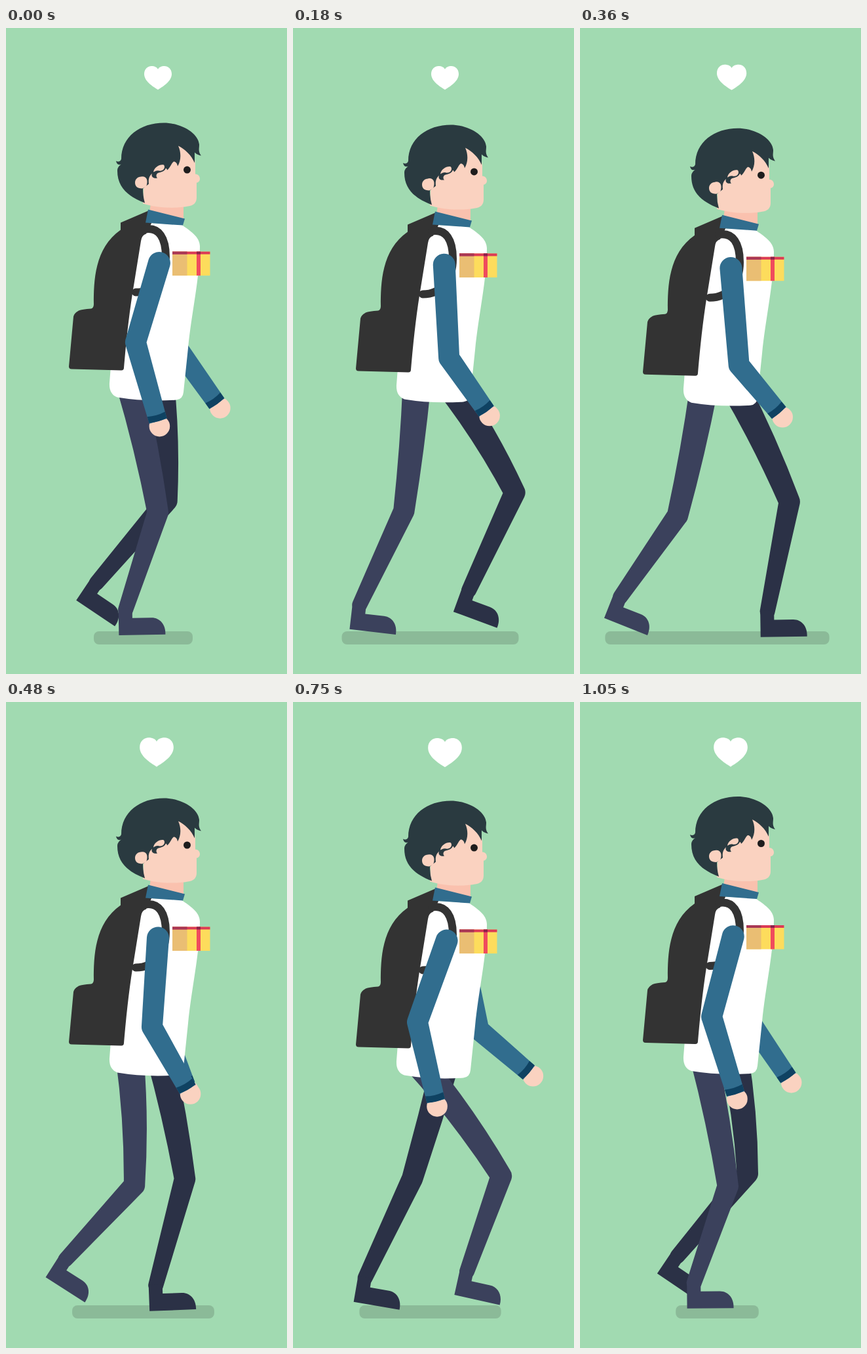
Recreate the animation shown at these times as an HTML page. Size 429 px wide and 984 px high, loop 1.08 s.

```html
<!DOCTYPE html>
<html lang="en">
<head>
<meta charset="utf-8">
<title>Walking</title>
<style>
  html, body { margin: 0; width: 100%; height: 100%; overflow: hidden; background: #a1dab1; }
  svg { display: block; width: 100vw; height: 100vh; }
  .near { fill: #3b415c; }
  .far { fill: #2b3146; }
  .bag { fill: #333; }
  .skin { fill: #fad2c0; }
  .hair { fill: #2a3a40; }
  .sleeve { fill: #316d8e; }
  .cuff { fill: #0f4262; }
</style>
</head>
<body>
<svg viewBox="0 0 429 984">
  <rect id="shadow" y="919" height="20" rx="8" fill="#8bba98"/>
  <path id="heart" fill="#fff" d="M0 18C-8 13-21 5-21-6C-21-14-15-18-10-18C-5-18-1-16 0-13C1-16 5-18 10-18C15-18 21-14 21-6C21 5 8 13 0 18Z"/>

  <g id="farArm"></g>
  <g id="farLeg" class="far"></g>
  <g id="nearLeg" class="near"></g>

  <g id="body">
    <path fill="#fff" d="M213 296L268 299C280 308 296 317 296 332C296 380 283 435 278 487L271 554Q270 565 260 566Q212 569 170 562Q157 557 158 540L160 515L200 320Z"/>
    <path class="bag" d="M175 296L217 278L222 297L214 313Q207 315 206 324L195 392Q186 445 180 517Q180 521 176 521L100 519Q96 519 96 515L103 439Q104 434 111 430Q116 428 130 427Q134 426 134 420C134 385 135 335 175 307Z"/>
    <path fill="none" stroke="#333" stroke-width="12" stroke-linecap="round" d="M212 306C234 302 244 320 244 348C244 378 228 402 198 402"/>
    <path fill="#fac1ae" d="M221 266H271V292L219 282Z"/>
    <path class="sleeve" d="M217 276L273 290L270 300L213 296Z"/>
    <path class="skin" d="M211 220L263 178L280 183Q288 194 289 206V222C294 222 296 226 296 229C296 233 293 235 291 235V258C291 266 286 270 278 271C255 275 228 273 209 267Z"/>
    <path class="hair" d="M176 207C171 209 169 206 168 202C171 204 175 203 176 199C176 165 205 144 241 144C268 144 294 160 295 177C295 184 293 187 298 194C294 193 291 192 288 189L288 205C283 193 273 184 263 179C268 190 267 202 262 210C261 205 259 203 256 203C252 206 251 212 246 216Q246 214 244 213C242 219 234 219 231 221C229 223 229 226 231 228C225 229 221 226 223 221C219 225 217 229 218 237L209 244Q209 256 212 266C186 256 170 242 170 217C170 212 173 209 176 207Z"/>
    <path class="skin" d="M225 219C226 211 236 206 241 208C244 212 240 218 234 217C230 216 228 217 225 219Z"/>
    <path class="skin" d="M206 226C214 224 218 231 214 241L208 244C200 244 197 240 197 235C197 230 201 226 206 226Z"/>
    <circle cx="276.5" cy="215.5" r="5.5" fill="#1e1d1d"/>
    <g>
      <rect x="254" y="340" width="57.5" height="36.5" fill="#fddc5c"/>
      <rect x="254" y="340" width="22.5" height="36.5" fill="#eabe73"/>
      <rect x="291" y="340" width="6" height="36.5" fill="#ef4b5d"/>
      <rect x="254" y="340" width="57.5" height="4" fill="#db3a57"/>
      <rect x="254" y="340" width="22.5" height="4" fill="#a83755"/>
      <rect x="291" y="340" width="6" height="4" fill="#8c2348"/>
    </g>
  </g>
  <g id="nearArm"></g>
</svg>
<script>
const LOOP = 1080, STEP = 30;
const STRIDE = 1034, HALF = STRIDE / 2;  // the loop cuts in slightly after a full stride
const TAU = 2 * Math.PI;

// Periodic swing: a centre plus one slow and one double-speed wave
function swing(t, centre, c1, s1, c2, s2) {
  const p = TAU * t / STRIDE;
  return centre + c1 * Math.cos(p) + s1 * Math.sin(p) + c2 * Math.cos(2 * p) + s2 * Math.sin(2 * p);
}

// Limbs of both sides follow the same swings, half a stride apart
const knee = t => [swing(t, 229.4, 6.6, -83.4, -4.2, 10.5), swing(t, 733.2, 2.9, 7.5, 1.7, -5.7)];
const heel = t => [swing(t, 141.5, 45.6, -98.1, -14.7, 3.2), swing(t, 904.6, 26.7, 1.2, -6.2, -7)];
const footTilt = t => swing(t, 13.4, -17.5, 1.4, 3, 2.1);
const elbow = t => [swing(t, 212.4, -9.3, 29.5, -5.2, 1), swing(t, 488.4, -5.3, 12.7, -5, -1.2)];
const wrist = t => [swing(t, 255.9, -18, 47.4, -5.7, 3), swing(t, 591.8, 3.8, -13, 2.7, .2)];
const bobbing = t => 4.2 + 5 * Math.cos(TAU * (t - 322) / HALF);

// Half width of the shadow at its turning points
const shadowTurns = [[0, 75.5], [40, 58], [180, 135], [345, 179], [565, 64], [850, 132], [LOOP, 53]];

function tween(turns, t) {
  const i = turns.findIndex(turn => turn[0] > t);
  const [t0, v0] = turns[i - 1], [t1, v1] = turns[i];
  return v0 + (v1 - v0) * (t - t0) / (t1 - t0);
}

const $ = id => document.getElementById(id);
const pt = (x, y) => x.toFixed(2) + ' ' + y.toFixed(2);
const shift = ([x, y], dx, dy) => [x + dx, y + dy];

function add(parent, tag, cls, attrs = {}) {
  const el = document.createElementNS('http://www.w3.org/2000/svg', tag);
  if (cls) el.setAttribute('class', cls);
  for (const k in attrs) el.setAttribute(k, attrs[k]);
  return parent.appendChild(el);
}

function unit([ax, ay], [bx, by]) {
  const len = Math.hypot(bx - ax, by - ay);
  return [(bx - ax) / len, (by - ay) / len];
}

// Tapered limb with round ends; bow bends it sideways, flat squares its far end
function limb(a, b, ra, rb, bow = 0, flat = false) {
  const [ux, uy] = unit(a, b), nx = uy, ny = -ux;
  const side = (p, r) => pt(p[0] + nx * r, p[1] + ny * r);
  const mid = [(a[0] + b[0]) / 2 + nx * bow, (a[1] + b[1]) / 2 + ny * bow], rm = (ra + rb) / 2;
  const end = flat ? 'L' : `A${rb} ${rb} 0 0 1 `;
  return `M${side(a, ra)}Q${side(mid, rm)} ${side(b, rb)}${end}${side(b, -rb)}` +
    `Q${side(mid, -rm)} ${side(a, -ra)}A${ra} ${ra} 0 0 1 ${side(a, ra)}Z`;
}

function makeLeg(id) {
  const g = $(id), bones = add(g, 'path');
  const foot = add(g, 'path', '', { d: 'M0 0H71C72-15 63-26 50-26H21V-40H0Z' });
  return (hip, knee, [hx, hy], deg) => {
    const r = deg * Math.PI / 180, c = Math.cos(r), s = Math.sin(r);
    const ankle = [hx + 11 * c + 39 * s, hy + 11 * s - 39 * c];
    const [tx, ty] = unit(hip, knee), [cx, cy] = unit(knee, ankle);
    const bend = Math.atan2(tx, ty) - Math.atan2(cx, cy);
    bones.setAttribute('d', limb(hip, knee, 21.5, 16.2, bend * 9) + limb(knee, ankle, 16.2, 11.5));
    foot.setAttribute('transform', `translate(${pt(hx, hy)}) rotate(${deg.toFixed(2)})`);
  };
}

function makeArm(id) {
  const g = $(id);
  const hand = add(g, 'circle', 'skin', { r: 15.8 });
  const sleeve = add(g, 'path', 'sleeve'), cuff = add(g, 'path', 'cuff');
  return (shoulder, elbow, wrist, bob) => {
    const [ux, uy] = unit(elbow, wrist), [wx, wy] = wrist;
    hand.setAttribute('cx', wx + ux * 8);
    hand.setAttribute('cy', wy + uy * 8);
    sleeve.setAttribute('d', limb(shoulder, elbow, 17, 16) + limb(elbow, wrist, 16, 14, 0, true));
    const corner = (along, r) => pt(wx - ux * along + uy * r, wy - uy * along - ux * r);
    cuff.setAttribute('d', `M${corner(11, 14)}L${corner(1, 14)}Q${corner(-2, 0)} ${corner(1, -14)}` +
      `L${corner(11, -14)}Q${corner(8, 0)} ${corner(11, 14)}Z`);
    g.setAttribute('transform', `translate(0 ${bob.toFixed(2)})`);
  };
}

const nearLeg = makeLeg('nearLeg'), farLeg = makeLeg('farLeg');
const nearArm = makeArm('nearArm'), farArm = makeArm('farArm');

function drawHeart(t) {
  const grow = Math.min(1, Math.max(0, (t - 330) / 90));
  const p = TAU * (t - 480) / 570;
  const x = 232 - grow * (1 + Math.cos(p)), y = 76 + grow * (.5 + 3.3 * Math.sin(p));
  $('heart').setAttribute('transform', `translate(${pt(x, y)}) scale(${(1 + .23 * grow).toFixed(3)})`);
}

function draw(t) {
  const bob = bobbing(t), other = t + HALF;
  $('body').setAttribute('transform', `translate(0 ${bob.toFixed(2)})`);

  nearLeg([189, 540 + bob], knee(t), heel(t), footTilt(t));
  farLeg([235, 535 + bob], shift(knee(other), 27, -12), shift(heel(other), 26, 0), footTilt(other));

  const bent = elbow(t);
  nearArm([233 - (bent[0] - 210) * .08, 357], bent, wrist(t), bob);
  farArm([256, 365], shift(elbow(other), 38, -12), shift(wrist(other), 54, -19), bob);

  const half = tween(shadowTurns, t);
  $('shadow').setAttribute('x', 209.5 - half);
  $('shadow').setAttribute('width', half * 2);
  drawHeart(t);
}

function tick() {
  draw(Math.floor((performance.now() % LOOP) / STEP) * STEP);
  requestAnimationFrame(tick);
}
tick();
</script>
</body>
</html>
```
